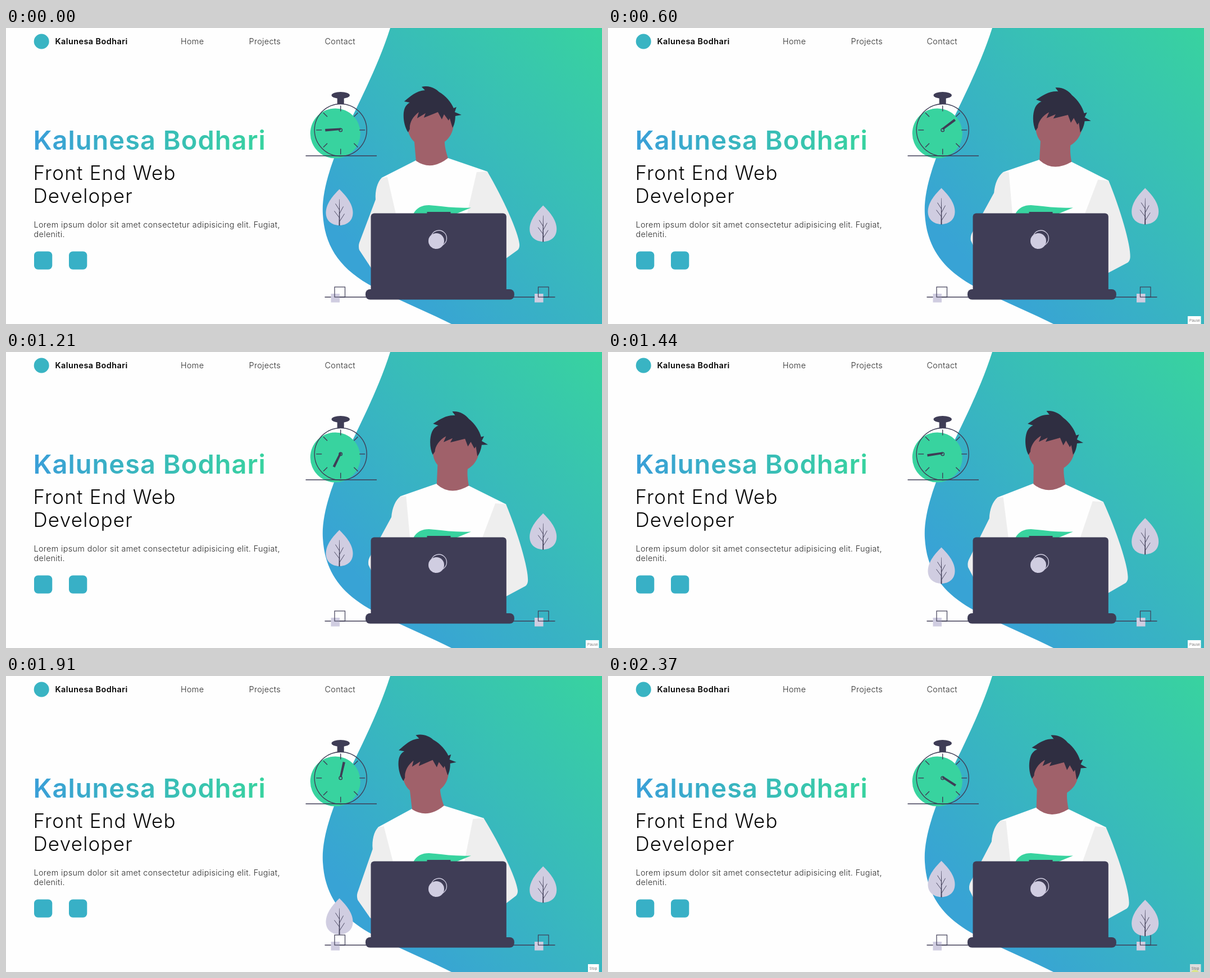
An HTML page that plays this animation: 1061 by 528 pixels, repeating every 2450 ms.

```html
<!DOCTYPE html>
<html lang="en">
<head>
<meta charset="utf-8">
<title>Portfolio</title>
<style>
  html, body { margin: 0; width: 100%; height: 100%; overflow: hidden; background: #fefefe; }
  svg { display: block; width: 1061px; height: 528px; }
  text { font-family: Inter, "Open Sans", sans-serif; font-size: 14.4px; font-weight: 350; letter-spacing: .34px; fill: #2b2b2b; }
  .brand { font-weight: 600; letter-spacing: .45px; fill: #000; }
  .title { font-weight: 600; font-size: 47px; letter-spacing: 1px; fill: url(#ink); }
  .role { font-size: 35px; letter-spacing: 1.2px; fill: #0a0a0a; }
  .tip text { font-size: 6.6px; letter-spacing: 0; fill: #555; }
  .dark { fill: #3f3d56; }
  .line { fill: none; stroke: #3f3d56; stroke-width: 1.4; }
  .lilac { fill: #d0cde1; }
  .green { fill: #38d39f; }
  .skin { fill: #a0616a; }
  .hair { fill: #2f2e41; }
  .sleeve { fill: #eee; }
</style>
</head>
<body>
<svg viewBox="0 0 1061 528">
  <defs>
    <linearGradient id="sky" x1="1" y1="0" x2="0" y2="1">
      <stop offset="0" stop-color="#38d39f"/>
      <stop offset=".82" stop-color="#38a3d5"/>
    </linearGradient>
    <linearGradient id="ink" gradientUnits="userSpaceOnUse" x1="50" y1="0" x2="462" y2="0">
      <stop offset="0" stop-color="#3a9fd8"/>
      <stop offset="1" stop-color="#38d39f"/>
    </linearGradient>
    <g id="leaf">
      <path class="lilac" d="M0 0C10 10 24 25 24 42C24 56 14 64.500 0 64.500C-14 64.500-24 56-24 42C-24 25-10 10 0 0Z"/>
      <path class="dark" d="M-.2 18L.3 18L1 65H-1Z"/>
      <path class="line" style="stroke-width:.9" d="M0 37L-7 26M0 44L7 31M0 51L-9 39M0 58L9 44"/>
    </g>
    <g id="boxes">
      <rect class="lilac" x="0" y="474" width="15.5" height="15.5"/>
      <rect class="line" style="stroke-width:1.2" x="6.5" y="462" width="18.5" height="18"/>
    </g>
  </defs>

  <path fill="url(#sky)" d="M684 0C660 75 624 140 597 200C572 258 562 300 564 332C567 385 590 425 645 457C690 482 745 504 793 528H1061V0Z"/>

  <circle cx="63.2" cy="24" r="13.5" fill="#39b4c3"/>
  <text class="brand" x="87.5" y="29">Kalunesa Bodhari</text>
  <text x="311" y="29">Home</text>
  <text x="432.500" y="29">Projects</text>
  <text x="567.500" y="29">Contact</text>

  <text class="title" x="48.5" y="217">Kalunesa Bodhari</text>
  <text class="role" x="48.5" y="271">Front End Web</text>
  <text class="role" x="48.5" y="312">Developer</text>
  <text x="49.5" y="356">Lorem ipsum dolor sit amet consectetur adipisicing elit. Fugiat,</text>
  <text x="49.5" y="373">deleniti.</text>
  <rect x="50" y="398.5" width="32.3" height="32.3" rx="7" fill="#38b0c6"/>
  <rect x="112" y="398.5" width="32.3" height="32.3" rx="7" fill="#38b0c6"/>

  <!-- stopwatch -->
  <circle class="green" cx="586.3" cy="188" r="44.6"/>
  <ellipse class="dark" cx="595.7" cy="120" rx="16.2" ry="6"/>
  <rect class="dark" x="589.7" y="120" width="12" height="16"/>
  <circle class="line" cx="595.7" cy="182" r="46.5"/>
  <path class="line" d="M533.5 228H660"/>
  <g id="ticks" class="line"></g>
  <path id="hand" class="dark" d="M-1.8 0L-2.2 -27.500H2.200L1.800 0Z"/>
  <circle class="line" cx="595.7" cy="182" r="2.8"/>

  <path class="line" d="M567.5 480H977.5"/>
  <use href="#boxes" x="578.5"/>
  <use href="#boxes" x="941"/>

  <g id="body">
    <path fill="#fefefe" d="M669 267L730 236L787 232L857 256L850 440H670Z"/>
    <path class="sleeve" d="M669 267L679 266L702 366L690 460L650 428L629 396Q627 389 629 383L658 306C657 290 661 275 669 267Z"/>
    <path class="sleeve" d="M857 256L838 257L812 370L875 422L911 396Q915 392 914 385C912 364 885 304 857 256Z"/>
    <path class="skin" d="M714 150L715 180C718 194 723 199 727 203L730 237Q757 255.500 787 232C783 220 781 210 781 203C790 196 796 186 797 172L792 145Z"/>
    <path class="hair" d="M716 186C709 176 706 158 709 146C711 139 715 135 719 133L709 131C720 122 730 112 746 111L740 105C752 102 764 107 771 114C783 121 793 133 797 143L802 141L799 150L811 155L800 157C800 166 798 174 795 178L790 161L788 165L780 154L776 163L769 150L744 160L747 152L732 161L735 150C724 158 718 170 719 180Z"/>
  </g>

  <path class="green" d="M725 332C731 320 741 316 753 316C776 318 800 322 828 320.500L800 332Z"/>

  <!-- laptop -->
  <rect class="dark" x="749.500" y="328" width="42" height="8"/>
  <rect class="dark" x="649.500" y="330.500" width="241.300" height="145" rx="6"/>
  <rect class="dark" x="640" y="466" width="264.800" height="18.600" rx="8"/>
  <circle cx="770.500" cy="375" r="14" fill="none" stroke="#d0cde1" stroke-width="1.300"/>
  <circle class="lilac" cx="766" cy="380" r="14"/>

  <use id="leafL" href="#leaf"/>
  <use id="leafR" href="#leaf"/>

  <g id="pause" class="tip">
    <rect x="1032" y="514" width="23.500" height="14" fill="#fff"/>
    <text x="1035" y="524">Pause</text>
  </g>
  <g id="stop" class="tip">
    <rect id="stopBox" x="1036" y="514" width="19.500" height="14" fill="#fff"/>
    <path id="glow" fill="#dbe58a" d="M1038 528Q1045 520 1052 528Z"/>
    <text x="1038.500" y="524">Stop</text>
  </g>
</svg>
<script>
const LOOP = 2450, STEP = 76.5, LAST = 31;
const $ = id => document.getElementById(id);
const move = (id, value) => $(id).setAttribute('transform', value);
const show = (id, on) => $(id).setAttribute('visibility', on ? 'visible' : 'hidden');

// [step, hand angle, sway phase]
const poses = [
  [0, 266, .15], [4, 341, .455], [8, 413, .745], [16, 566, 1.32],
  [22, 677, 1.792], [27, 770, 2.237], [31, 843, 2.55]
];

function pose(step, col) {
  const i = Math.max(1, poses.findIndex(p => p[0] >= step));
  const a = poses[i - 1], b = poses[i];
  return a[col] + (b[col] - a[col]) * (step - a[0]) / (b[0] - a[0]);
}

// The CSS "ease" curve, cubic-bezier(.25, .1, .25, 1)
function ease(x) {
  const bez = (s, p, q) => 3 * (1 - s) * (1 - s) * s * p + 3 * (1 - s) * s * s * q + s ** 3;
  let lo = 0, hi = 1;
  for (let i = 0; i < 24; i++) {
    const mid = (lo + hi) / 2;
    if (bez(mid, .25, .25) < x) lo = mid; else hi = mid;
  }
  return bez(lo, .1, 1);
}

// Eased back-and-forth motion, 0 at even phases and 1 at odd ones
function swing(phase) {
  const p = ((phase % 2) + 2) % 2;
  return ease(p < 1 ? p : 2 - p);
}

function draw(step) {
  const t = step * STEP;
  const leafY = low => 399.5 - 116 * swing((t - low) / 1500);
  move('hand', `translate(595.7 180.3) rotate(${pose(step, 1)})`);
  move('body', `rotate(${10.4 * swing(pose(step, 2)) - 1.95} 758 508)`);
  move('leafL', `translate(593.5 ${leafY(1850)})`);
  move('leafR', `translate(956.2 ${leafY(2365)})`);
  show('pause', step >= 6 && step < 25);
  show('stop', step >= 25);
  show('glow', step >= 30);
  $('stopBox').setAttribute('fill', step >= 30 ? '#dcdcdc' : '#fff');
}

$('ticks').innerHTML = [...Array(8).keys()].map(i =>
  `<path d="M0 -33.5V-43.5" transform="translate(595.7 182) rotate(${i * 45})"/>`).join('');

let start;
function tick(now) {
  start ??= now;
  draw(Math.min(LAST, Math.floor(((now - start) % LOOP + 18) / STEP)));
  requestAnimationFrame(tick);
}
draw(0);
requestAnimationFrame(tick);
</script>
</body>
</html>
```
